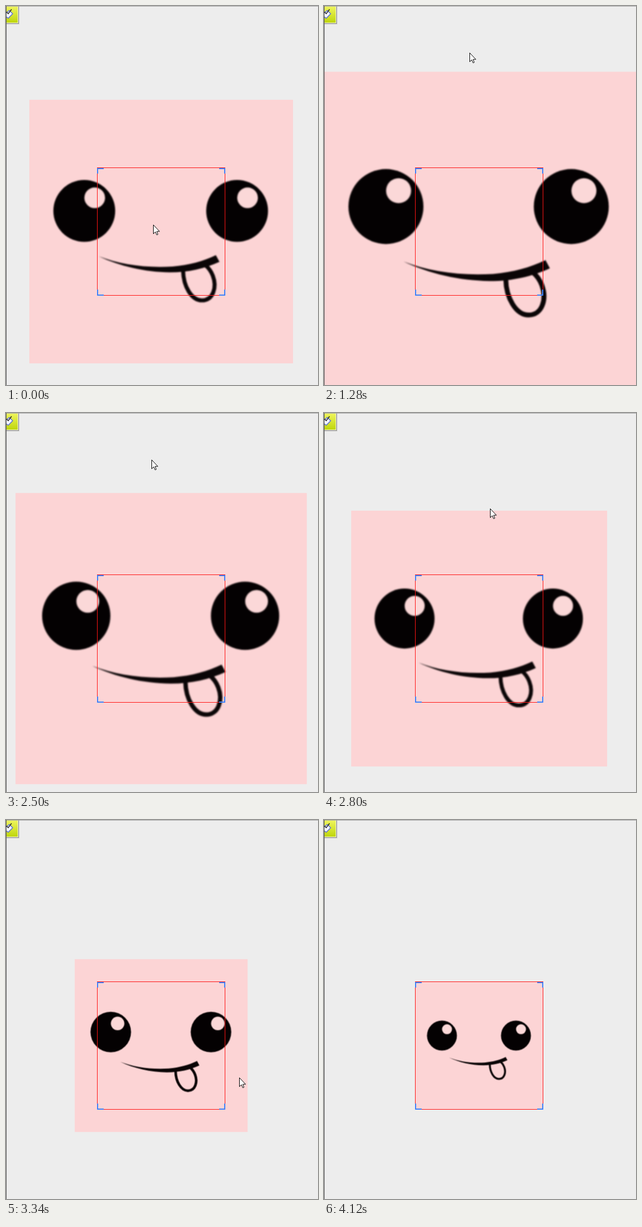
These frames come from a looping animation (562 px wide and 683 px high, 4.52 s). An HTML page:

```html
<!DOCTYPE html>
<html lang="en">
<head>
<meta charset="utf-8">
<title>Zoom to crop</title>
<style>
html, body { margin: 0; width: 100%; height: 100%; overflow: hidden; background: #ededed; }
svg { display: block; }
.crisp { shape-rendering: crispEdges; }
.soft { filter: blur(1px); }
</style>
</head>
<body>
<svg width="562" height="683" viewBox="0 0 562 683">
  <defs>
    <linearGradient id="lime" x2="0" y2="1">
      <stop offset="0" stop-color="#eef45c"/>
      <stop offset="1" stop-color="#bfd60c"/>
    </linearGradient>
    <g id="eye">
      <circle r="55.7" fill="#040102"/>
      <circle cx="18.8" cy="-23.6" r="18.6" fill="#fbd8d8"/>
    </g>
  </defs>
  <rect width="562" height="683" fill="#ededed"/>

  <!-- face, drawn 475 units wide around its centre -->
  <g id="face">
    <rect x="-237.5" y="-237.5" width="475" height="475" fill="#fcd4d5"/>
    <g class="soft">
      <use href="#eye" x="-138.5" y="-37.2"/>
      <use href="#eye" x="136.8" y="-37.2"/>
      <g transform="translate(-279.5 -406.5)">
        <path d="M319 477C319.5 505 334 530.5 353 530.5C373 530.5 380.5 507 372.5 486C369 477 364 471 359 467" fill="none" stroke="#0a0506" stroke-width="7.2"/>
        <path d="M167 451C205 465.5 250 472.5 300 469.5C330 467 355 460 378 449L384.5 461C358 473 330 480 295 480C250 479.5 205 469 167 451Z" fill="#0a0506"/>
      </g>
    </g>
  </g>

  <!-- crop frame -->
  <g class="crisp" fill="none">
    <rect x="164.5" y="291.5" width="230" height="230" stroke="#ff1414"/>
    <path d="M165 302V293H176M384 293H394V302M394 511V521H384M176 521H165V511" stroke="#3c82fa" stroke-width="2"/>
  </g>

  <!-- window edges and tool button -->
  <g class="crisp">
    <rect width="562" height="1" fill="#a8a8a8"/>
    <rect y="1" width="24" height="32" fill="#c8c8c8"/>
    <rect y="1" width="23" height="31" fill="#8c8c84"/>
    <rect y="1" width="22" height="30" fill="#f8fad8"/>
    <rect y="1" width="21" height="29" fill="url(#lime)"/>
  </g>
  <path d="M0 13L6 8L12 14L4 22L0 19" fill="#f4f6ff" stroke="#5a6ed8" stroke-width="1.4"/>
  <path d="M0 10L4 14L10 6" fill="none" stroke="#222" stroke-width="1.4"/>
  <rect class="crisp" width="1" height="683" fill="#555"/>

  <g id="cursor">
    <circle id="click" cx="1.5" cy="1.5" r="10.5" fill="#ff0" fill-opacity=".47"/>
    <path d="M.5.5V16.5L4 13L6.5 18.5L8.7 17.7L6.5 12.2H11.5Z" fill="#fff" stroke="#000" stroke-linejoin="round"/>
  </g>
</svg>
<script>
const LOOP = 4520;
// each stretch of time is shown in a number of equal hard steps: [start ms, steps]
const beats = [[0, 3], [380, 6], [1280, 1], [1840, 1], [1960, 4], [2500, 4], [3040, 4], [3610, 4], [4120, 1], [LOOP, 1]];
// cursor path: [ms, x, y]
const path = [
  [680, 265, 394], [830, 255, 226], [980, 257, 153], [1280, 262, 84],
  [2500, 262, 84], [2650, 264, 87], [3040, 378, 364], [3460, 440, 512],
  [3610, 532, 542], [3970, 545, 631]
];
const [face, cursor, click] = ['face', 'cursor', 'click'].map(id => document.getElementById(id));
const start = performance.now();

const progress = (t, from, to) => Math.min(1, Math.max(0, (t - from) / (to - from)));
const lastBefore = (keys, t) => Math.max(0, keys.findLastIndex(key => key[0] <= t));

function snap(t) {
  const i = lastBefore(beats, t);
  const [from, steps] = beats[i];
  const length = (beats[i + 1][0] - from) / steps;
  return from + Math.floor((t - from) / length) * length;
}

function zoom(t) {
  const grow = 1 - (1 - progress(t, 0, 680)) ** 2.1;
  const shrink = (1 - Math.cos(Math.PI * progress(t, 2012, 3950))) / 2;
  return 475 + 101 * grow - 346 * shrink;
}

function pointer(t) {
  const i = lastBefore(path, t);
  const a = path[i], b = path[i + 1] || a;
  const u = a === b ? 0 : progress(t, a[0], b[0]);
  return [1, 2].map(k => Math.round(a[k] + (b[k] - a[k]) * u));
}

function draw(now) {
  const t = snap(Math.max(0, now - start) % LOOP);
  face.setAttribute('transform', `translate(279.5 406.5) scale(${zoom(t) / 475})`);
  cursor.setAttribute('transform', `translate(${pointer(t)})`);
  cursor.style.display = t < 4120 ? '' : 'none';
  click.style.display = t >= 1840 && t < 1960 ? '' : 'none';
  requestAnimationFrame(draw);
}
draw(start);
</script>
</body>
</html>
```
